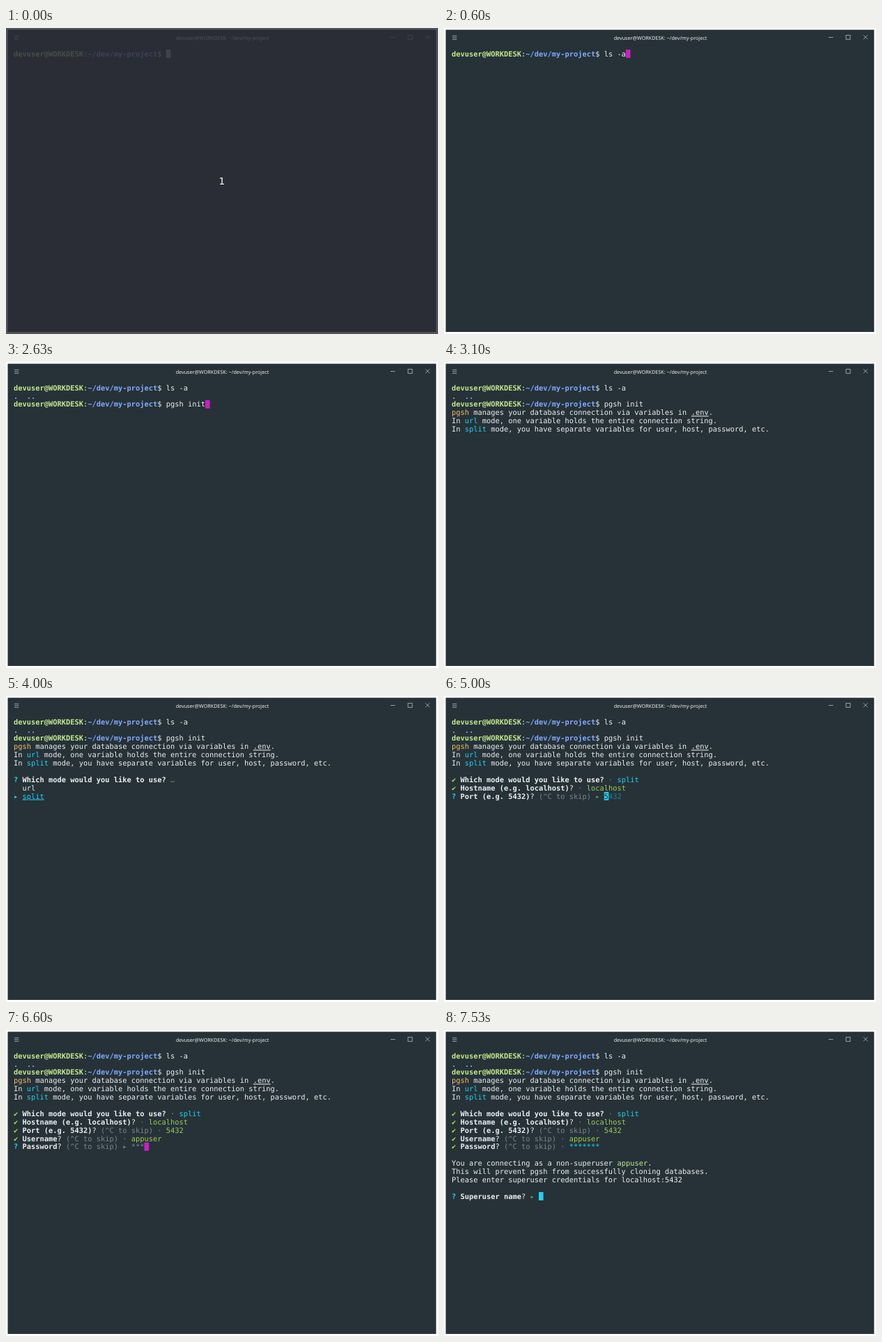
An HTML page for the animation above (8000 ms loop, 620 by 440 pixels).

```html
<!DOCTYPE html>
<html lang="en">
<head>
<meta charset="utf-8">
<title>Terminal session</title>
<style>
  html, body { margin: 0; width: 100%; height: 100%; overflow: hidden; background: #fff; }
  svg { display: block; width: 620px; height: 440px; }
  text { white-space: pre; text-rendering: geometricPrecision; }
  #screen { font: 10.38px "DejaVu Sans Mono", monospace; fill: #eceff1; }
  #title { font: 500 7.2px "Noto Sans", sans-serif; fill: #eceff1; text-anchor: middle; }
  #count { font: 13.7px "DejaVu Sans", sans-serif; fill: #fff; text-anchor: middle; }
  .icons { fill: none; stroke: #b4bcc0; stroke-width: .8; }
  .bold { font-weight: bold; }
  .user { font-weight: bold; fill: #c3e88d; }
  .path { font-weight: bold; fill: #82aaff; }
  .lime { fill: #c3e88d; }
  .done { fill: #9ccc55; }
  .tick { fill: #a9e34b; }
  .gold { fill: #f0bd6a; }
  .cyan { fill: #22d0f2; }
  .ask { fill: #22d0f2; font-weight: bold; }
  .hint { fill: #228299; }
  .grey { fill: #79858a; }
  .link { text-decoration: underline; }
  .pick { fill: #22d0f2; text-decoration: underline; }
  .block { fill: #263238; }
</style>
</head>
<body>
<svg viewBox="0 0 620 440">
  <rect width="620" height="440" fill="#fff"/>
  <rect x="2.5" y="2.5" width="614.8" height="434.5" fill="#263238"/>
  <text id="title" x="310.5" y="16.7"></text>
  <g class="icons">
    <path d="M12 11.3h6.3M12 13.8h6.3M12 16.3h6.3M552 13.5h6.5M602 10.2l6 6M608 10.2l-6 6"/>
    <rect x="577" y="10.3" width="6" height="6"/>
  </g>
  <g id="screen"></g>
  <g id="countdown">
    <rect width="620" height="440" fill="rgb(43,45,54)" opacity=".82"/>
    <text id="count" x="309.8" y="224.6">1</text>
  </g>
</svg>
<script>
const LOOP = 8000;
const LEFT = 11, TOP = 31.1, CELL = 6.25, LINE = 11.88, ASCENT = 9.6;
const HOST = 'devuser@WORKDESK', DIR = '~/dev/my-project', LOGIN = 'appuser';
const BLOCKS = { cursor: '#cb1fc4', block: '#22d0f2', idle: '#a4acb0' };

const screen = document.getElementById('screen');
const countdown = document.getElementById('countdown');
document.getElementById('title').textContent = `${HOST}: ${DIR}`;

// Styled runs are written as {style|text}.
const PROMPT = `{user|${HOST}}:{path|${DIR}}$ `;
const CURSOR = '{cursor| }', EMPTY = '{block| }';
const SKIP = ' {grey|(^C to skip)}';

const latest = (t, ...steps) => steps.filter(([start]) => t >= start).pop()[1];
const asking = (label, value) => `{ask|?} {bold|${label} {grey|▸} ${value}`;
const answered = (label, value) => `{tick|✔} {bold|${label} {grey|·} ${value}`;
const field = (t, end, label, input, result) =>
  t < end ? asking(label, input) : answered(label, result);
const preset = value => `{block|${value[0]}}{hint|${value.slice(1)}}`;

function modeQuestion(t) {
  const label = '{bold|Which mode would you like to use?}';
  if (t >= 4130) return [`{tick|✔} ${label} {grey|·} {cyan|split}`];
  const option = (name, on) => on ? `{cyan|▸} {pick|${name}}` : `  ${name}`;
  return [`{ask|?} ${label} {grey|…}`, option('url', t < 4000), option('split', t >= 4000)];
}

function rowsAt(t) {
  const list = latest(t, [0, ''], [470, 'ls'], [570, 'ls -a']);
  if (t < 670) return [PROMPT + list + (t < 270 ? '{idle| }' : CURSOR)];

  const command = latest(t, [0, ''], [1730, 'pg'], [2170, 'pgsh'],
    [2400, 'pgsh i'], [2500, 'pgsh in'], [2630, 'pgsh init']);
  const rows = [PROMPT + list, '{path|.  ..}', PROMPT + command + (t < 2970 ? CURSOR : '')];
  if (t < 2970) return rows;
  if (t < 3100) return [...rows, CURSOR];

  rows.push(
    '{gold|pgsh} manages your database connection via variables in {link|.env}.',
    'In {cyan|url} mode, one variable holds the entire connection string.',
    'In {cyan|split} mode, you have separate variables for user, host, password, etc.', '');

  if (t >= 3530) rows.push(...modeQuestion(t));
  if (t >= 4130) rows.push(field(t, 4570, 'Hostname (e.g. localhost)}?',
    preset('localhost'), '{done|localhost}'));
  if (t >= 5000) rows.push(field(t, 5430, 'Port (e.g. 5432)}?' + SKIP,
    preset('5432'), '{done|5432}'));
  if (t >= 5430) {
    const typed = latest(t, [0, 1], [5570, 2], [5870, 5], [6000, 7]);
    rows.push(field(t, 6170, 'Username}?' + SKIP,
      LOGIN.slice(0, typed) + CURSOR, `{done|${LOGIN}}`));
  }
  if (t >= 6170) {
    const typed = latest(t, [0, 0], [6430, 2], [6600, 3], [6830, 5], [6970, 6]);
    rows.push(field(t, 7400, 'Password}?' + SKIP,
      typed ? `{grey|${'*'.repeat(typed)}}${CURSOR}` : EMPTY, '{cyan|*******}'));
  }
  if (t >= 7530) rows.push('',
    `You are connecting as a non-superuser {lime|${LOGIN}}.`,
    'This will prevent pgsh from successfully cloning databases.',
    'Please enter superuser credentials for localhost:5432', '',
    asking('Superuser name}?', EMPTY));
  return rows;
}

function drawRow(markup, row) {
  const y = TOP + row * LINE;
  let column = 0, svg = '';
  for (const [run, style = '', styled] of markup.matchAll(/\{(\w+)\|([^}]*)\}|[^{]+/g)) {
    const text = styled ?? run;
    const x = LEFT + column * CELL;
    if (BLOCKS[style])
      svg += `<rect x="${x}" y="${y}" width="6.6" height="11.9" fill="${BLOCKS[style]}"/>`;
    if (text.trim())
      svg += `<text class="${style}" x="${x}" y="${y + ASCENT}">${text}</text>`;
    column += text.length;
  }
  return svg;
}

let shown = '';
function render(t) {
  countdown.style.display = t < 270 ? '' : 'none';
  const svg = rowsAt(t).map(drawRow).join('');
  if (svg !== shown) screen.innerHTML = shown = svg;
}

const start = performance.now();
function tick() {
  render((performance.now() - start) % LOOP);
  requestAnimationFrame(tick);
}
tick();
</script>
</body>
</html>
```
